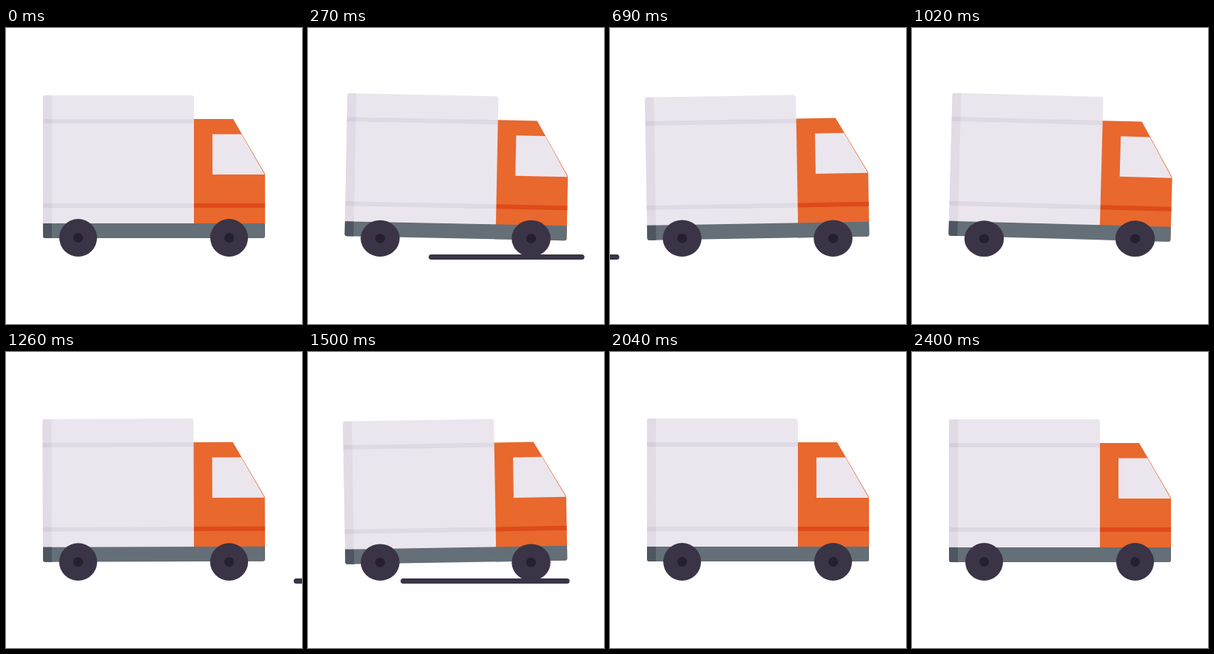
Recreate the animation shown at these times as an HTML page. Size 400 by 400 pixels, loop 2490 ms.

```html
<!DOCTYPE html>
<html lang="en">
<head>
<meta charset="utf-8">
<title>Delivery truck</title>
<style>
  html, body { margin: 0; width: 100%; height: 100%; overflow: hidden; background: #fff; }
  svg { display: block; width: 100%; height: 100%; }
</style>
</head>
<body>
<svg viewBox="0 0 400 400">
  <defs>
    <g id="wheel">
      <circle cy="-25.5" r="25.5" fill="#3a3446"/>
      <circle cy="-25.5" r="6.5" fill="#261f30"/>
    </g>
  </defs>
  <line id="road" y1="309.5" y2="309.5" stroke="#3a3446" stroke-width="7" stroke-linecap="round"/>
  <g id="body">
    <path d="M253 123H307L350 197V281q0 3-3 3H253z" fill="#e8682e"/>
    <path d="M253.5 237H350v6H253.5z" fill="#df4a1a"/>
    <path d="M279 143.5H318.3L349.6 198H279z" fill="#ebe6ed"/>
    <path d="M50 264V94q0-3 3-3H251q3 0 3 3V264z" fill="#ebe6ed"/>
    <path d="M50 264V94q0-3 3-3H62V264z" fill="#e0dbe5"/>
    <path d="M50 123H254v6H50zM50 237H254v6H50z" fill="#7a6490" fill-opacity=".1"/>
    <path d="M50 264H350V281q0 3-3 3H53q-3 0-3-3z" fill="#646f78"/>
    <path d="M50 264H62V284H53q-3 0-3-3z" fill="#4f5661"/>
  </g>
  <use class="wheel" href="#wheel" data-x="97.5"/>
  <use class="wheel" href="#wheel" data-x="301.5"/>
</svg>
<script>
const LOOP = 2490, MOVE_END = 2400, ROCK = 810, ROAD = 1200;
const road = document.getElementById('road');
const body = document.getElementById('body');
const wheels = document.querySelectorAll('.wheel');

const ease = (t, start, duration) => {
  const u = Math.min(1, Math.max(0, (t - start) / duration));
  return u * u * (3 - 2 * u);
};

// Eases through evenly spaced keys, phase 0..1
const through = (keys, phase) => {
  const pos = phase * (keys.length - 1), i = Math.floor(pos);
  return keys[i] + (keys[i + 1] - keys[i]) * ease(pos, i, 1);
};

function draw(t) {
  const phase = t < MOVE_END ? t % ROCK / ROCK : 0;
  const tilt = through([0, 1, 0, -1, 0], phase);
  const bob = through([0, .7, -1, .5, 0], phase);
  const squash = .045 * Math.abs(tilt);
  body.setAttribute('transform', `translate(0 ${bob}) rotate(${1.55 * tilt} 200 260)`);
  for (const wheel of wheels) {
    wheel.setAttribute('transform',
      `translate(${wheel.dataset.x} 309) scale(${1 + squash} ${1 - squash})`);
  }

  const r = t < MOVE_END ? t % ROAD : 0;
  road.setAttribute('x1', 410 - 430 * ease(r, 0, 498));
  road.setAttribute('x2', 410 - 430 * ease(r, 150, 643));
}

const start = performance.now();
function tick() {
  draw((performance.now() - start) % LOOP);
  requestAnimationFrame(tick);
}
tick();
</script>
</body>
</html>
```
